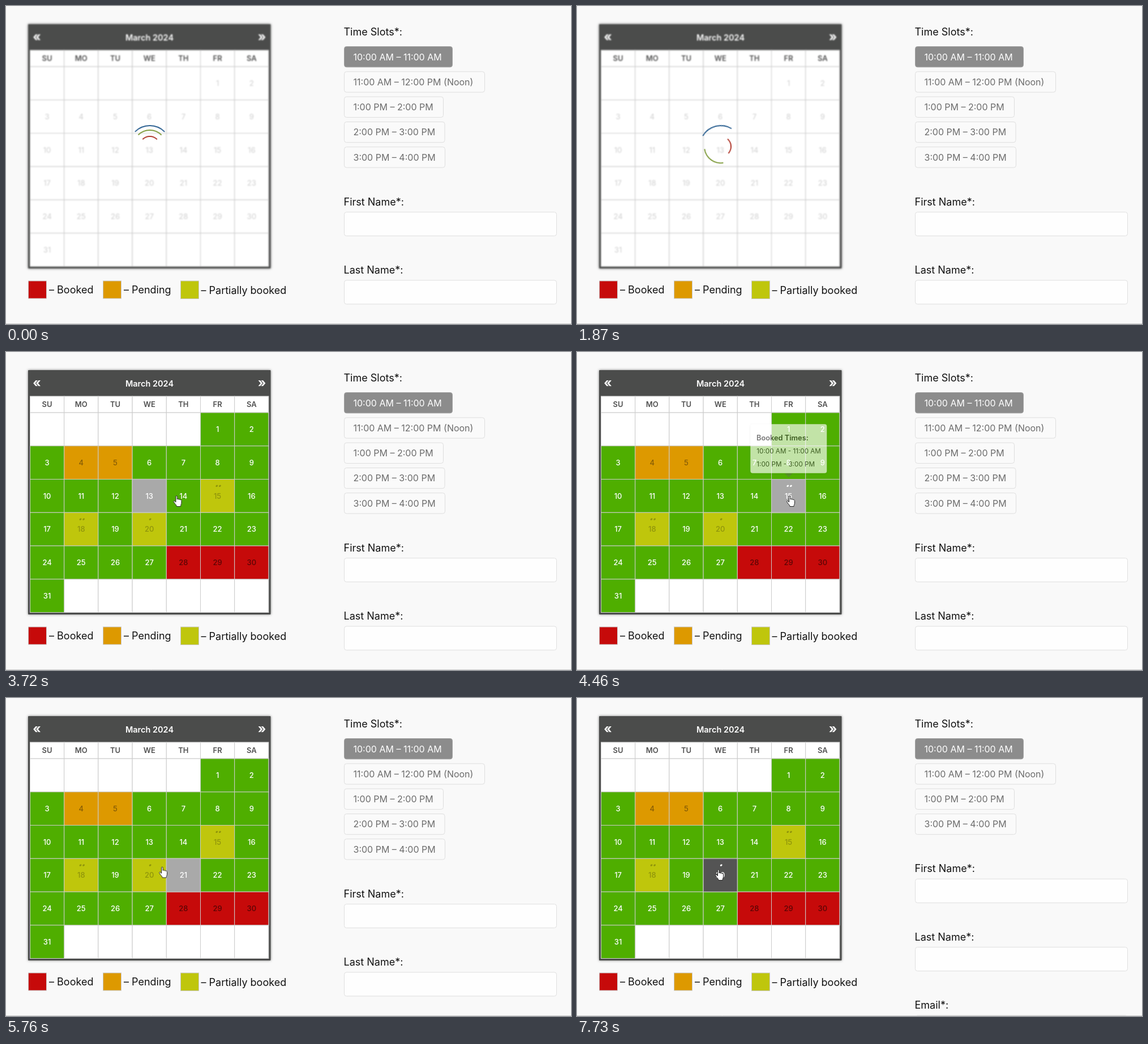
An HTML page that plays this animation: 998x561 px, repeating every 8000 ms.

```html
<!DOCTYPE html>
<html lang="en">
<head>
<meta charset="utf-8">
<title>Booking calendar</title>
<style>
  html, body { margin: 0; width: 100%; height: 100%; overflow: hidden; background: #f9f9f9; }
  svg { display: block; width: 998px; height: 561px; font-family: Inter, Roboto, sans-serif; }

  .label { font-size: 18px; fill: #111; }
  .slot rect { fill: #fafafa; stroke: #dedede; }
  .slot text { font-size: 16px; fill: #6c6c6c; }
  .slot.on rect { fill: #8c8c8c; stroke: #a2a2a2; }
  .slot.on text { fill: #fff; }
  .field { fill: #fefefe; stroke: #dfdfdf; }

  .frame { fill: #4b4c4b; filter: drop-shadow(0 0 2px rgba(0, 0, 0, .5)); }
  .cell { stroke: #ccc; }
  .head { font-size: 14.5px; font-weight: 600; fill: #fff; }
  .arrow { font-size: 22px; font-weight: 700; fill: #fff; }
  .week { font-size: 13px; font-weight: 600; fill: #505050; }
  .num { font-size: 13px; font-weight: 500; }
  .mid { text-anchor: middle; }

  .tip rect { fill: #fff; filter: drop-shadow(0 1px 2px rgba(0, 0, 0, .1)); }
  .tip path { fill: #666; opacity: .6; }
  .tip text { font-size: 11.7px; fill: #333; }
  .tip .title { font-size: 12.8px; font-weight: 600; }
  .pointer path { fill: #fff; stroke: #222; stroke-linejoin: round; }

  /* every track shares the same 8 s loop */
  .anim { animation: 8s linear infinite; }
  .step { animation: 8s step-end infinite; }

  #cal { animation-name: focus; }
  #pale { animation-name: leave; }
  #live { animation-name: enter; }
  #loader { animation-name: loader; }
  .spin1 { animation-name: spin1; }
  .spin2 { animation-name: spin2; }
  .spin3 { animation-name: spin3; }
  #hover { animation-name: hover; }
  #d15 { animation-name: lit15; }
  #d20 { animation-name: lit20; }
  #tip15 { animation-name: tip15; }
  #tip20 { animation-name: tip20; }
  #pointer { animation-name: move; }
  #arrow { animation-name: arrow; }
  #hand { animation-name: hand; }
  #gone { animation-name: gone; }
  #rest { animation-name: rest; }

  @keyframes focus { 0%, 24.75% { filter: blur(1px); } 26.5%, 100% { filter: blur(0); } }
  @keyframes leave { 0%, 24.75% { opacity: 1; } 26.5%, 100% { opacity: 0; } }
  @keyframes enter { 0%, 24.75% { opacity: 0; } 26.5%, 100% { opacity: 1; } }
  @keyframes loader { 0% { opacity: 1; } 24.75%, 100% { opacity: 0; } }
  @keyframes spin1 { to { transform: rotate(1478.5deg); } }
  @keyframes spin2 { to { transform: rotate(985.6deg); } }
  @keyframes spin3 { to { transform: rotate(1971.3deg); } }

  @keyframes hover {
    0% { opacity: 0; transform: translate(0, 117.5px); fill: #a9a9a9; }
    38.375% { opacity: 1; transform: translate(0, 117.5px); }
    40.75% { transform: translate(60.2px, 117.5px); }
    42.875% { transform: translate(120.4px, 117.5px); }
    44.75% { transform: translate(180.6px, 117.5px); }
    46.6875% { transform: translate(240.8px, 117.5px); }
    48.625% { transform: translate(301px, 117.5px); }
    69% { transform: translate(240.8px, 117.5px); }
    70.875% { transform: translate(240.8px, 176.25px); }
    72.375% { transform: translate(180.6px, 176.25px); }
    93.125%, 100% { opacity: 1; transform: translate(180.6px, 176.25px); fill: #545454; }
  }
  @keyframes lit15 { 0% { fill: #8f940c; } 48.625% { fill: #fff; } 69%, 100% { fill: #8f940c; } }
  @keyframes lit20 { 0% { fill: #8f940c; } 72.375%, 100% { fill: #fff; } }

  @keyframes tip15 {
    0%, 54.5% { opacity: 0; animation-timing-function: cubic-bezier(.2, .6, .4, 1); }
    58.75%, 68.75% { opacity: 1; }
    71.875%, 100% { opacity: 0; }
  }
  @keyframes tip20 {
    0%, 79.5% { opacity: 0; animation-timing-function: cubic-bezier(.2, .6, .4, 1); }
    83.375%, 93.125% { opacity: 1; }
    96.5%, 100% { opacity: 0; }
  }

  @keyframes move {
    0%, 35.75% { transform: translate(5px, 247px); animation-timing-function: cubic-bezier(.3, .15, .7, .65); }
    46.5% { transform: translate(301px, 253px); animation-timing-function: cubic-bezier(.2, .46, .5, 1); }
    51.875%, 65.25% { transform: translate(376px, 253px); animation-timing-function: ease-in-out; }
    75.125% { transform: translate(250px, 309px); animation-timing-function: ease-in-out; }
    80%, 85.5% { transform: translate(249px, 302px); }
    85.625%, 100% { transform: translate(250px, 302px); }
  }
  @keyframes arrow { 0% { opacity: 0; } 35.75% { opacity: 1; } 38.375%, 100% { opacity: 0; } }
  @keyframes hand { 0% { opacity: 0; } 38.375%, 100% { opacity: 1; } }

  @keyframes gone { 0% { opacity: 1; } 93.125%, 100% { opacity: 0; } }
  @keyframes rest { 0% { transform: translate(0, 0); } 93.125%, 100% { transform: translate(0, -44.3px); } }
</style>
</head>
<body>
<svg viewBox="0 0 998 561">
  <g id="cal" class="anim">
    <rect class="frame" x="39" y="32" width="428.5" height="431" rx="1"/>
    <text class="arrow mid" x="54.5" y="62">«</text>
    <text class="head mid" x="253.5" y="61">March 2024</text>
    <text class="arrow mid" x="452" y="62">»</text>
    <g id="grid"></g>
    <g id="pale" class="anim" fill="#d6d6d6"></g>
    <g id="live" class="anim">
      <g id="fills"></g>
      <rect id="hover" class="cell step" x="42.5" y="107" width="60.2" height="58.75"/>
      <g id="nums"></g>
    </g>
  </g>

  <g id="loader" class="step"><g transform="translate(254 248)" fill="none" stroke-width="2">
    <g class="anim spin1">
      <path id="arc37" stroke="#2f6393"/>
      <g class="anim spin2"><path id="arc29" stroke="#7f9b3c"/></g>
      <g class="anim spin3"><path id="arc18" stroke="#b0392d"/></g>
    </g>
  </g></g>

  <g stroke="#c9c9c9">
    <rect x="39.5" y="485" width="32" height="31" fill="#c60a0a"/>
    <rect x="171.5" y="485" width="32" height="31" fill="#dd9900"/>
    <rect x="308.5" y="485" width="32" height="31.5" fill="#bfc60c"/>
  </g>
  <text class="label" x="76" y="507.3">– Booked</text>
  <text class="label" x="208" y="507.3">– Pending</text>
  <text class="label" x="344.5" y="507.5">– Partially booked</text>

  <text class="label" x="596.5" y="51.8">Time Slots*:</text>
  <g id="slots"></g>
  <g id="gone" class="step"></g>
  <g id="rest" class="step"></g>

  <g id="tip15" class="tip anim"></g>
  <g id="tip20" class="tip anim"></g>

  <g id="pointer" class="pointer anim">
    <g id="arrow" class="step"><path d="M.5 0V15L4 11.8L6.4 17L8.5 16L6.2 11H10.8Z"/></g>
    <g id="hand" class="step">
      <path transform="translate(-6 0)" d="M4.5 12V2C4.5.2 7 .2 7 2V7C7 5.8 9.3 5.9 9.5 7.3C9.8 6.3 11.8 6.5 12 8C12.5 7.2 14.5 7.5 14.5 9.5V13C14.5 16 13 16.5 13 19.5H6C6 17.5 4.5 16.5 3 14.5L.8 11.5C0 10 2 9 3 10.2Z"/>
    </g>
  </g>
  <path d="M0 560.5H998" stroke="#cbcbcb"/>
</svg>

<script>
  const $ = id => document.getElementById(id);
  const add = (id, markup) => $(id).insertAdjacentHTML('beforeend', markup);

  const X = 42.5, Y = 107, W = 60.2, H = 58.75;
  const box = (x, y, h, fill) =>
    `<rect class="cell" x="${x}" y="${y}" width="${W}" height="${h}" fill="${fill}"/>`;

  // calendar
  const kinds = {
    free: ['#4fae00', '#fff'],
    pending: ['#dd9900', '#855c06'],
    partial: ['#bfc60c', '#8f940c'],
    booked: ['#c60a0a', '#5a0505']
  };
  const dots = { 15: 2, 18: 2, 20: 1 };
  const kindOf = d =>
    d === 4 || d === 5 ? 'pending' : dots[d] ? 'partial' : d > 27 && d < 31 ? 'booked' : 'free';

  ['SU', 'MO', 'TU', 'WE', 'TH', 'FR', 'SA'].forEach((name, c) => {
    const x = X + c * W;
    add('grid', box(x, 78, Y - 78, '#fff') +
      `<text class="week mid" x="${x + W / 2}" y="97.3">${name}</text>`);
  });

  for (let i = 0; i < 42; i++) {
    const x = X + i % 7 * W, y = Y + Math.floor(i / 7) * H, d = i - 4;
    add('grid', box(x, y, H, '#fff'));
    if (d < 1 || d > 31) continue;
    const [back, ink] = kinds[kindOf(d)];
    const cx = x + W / 2;
    let mark = `<text class="num mid" x="${cx}" y="${y + H / 2 + 4.7}">${d}</text>`;
    add('pale', mark);
    add('fills', box(x, y, H, back));
    for (let k = 0, n = dots[d] || 0; k < n; k++) {
      const dx = cx + 1.5 + (k - (n - 1) / 2) * 5.6;
      mark += `<ellipse rx="2.1" ry="1.5" transform="translate(${dx} ${y + 11.7}) rotate(-35)"/>`;
    }
    add('nums', `<g id="d${d}" class="step" fill="${ink}">${mark}</g>`);
  }

  // loader arcs, a quarter turn each
  for (const r of [37, 29, 18]) {
    const k = r * Math.SQRT1_2;
    $('arc' + r).setAttribute('d', `M${-k} ${-k}A${r} ${r} 0 0 1 ${k} ${-k}`);
  }

  // form
  const slot = (id, row, width, text, on = '') => {
    const y = 71.5 + row * 44.3;
    add(id, `<g class="slot ${on}"><rect x="597.5" y="${y}" width="${width}" height="36.3" rx="4"/>
      <text x="613.5" y="${y + 24}">${text}</text></g>`);
  };
  slot('slots', 0, 191, '10:00 AM – 11:00 AM', 'on');
  slot('slots', 1, 248, '11:00 AM – 12:00 PM (Noon)');
  slot('slots', 2, 175, '1:00 PM – 2:00 PM');
  slot('gone', 3, 177.5, '2:00 PM – 3:00 PM');
  slot('rest', 4, 178, '3:00 PM – 4:00 PM');
  ['First Name', 'Last Name', 'Email'].forEach((name, i) => {
    const y = 351.8 + i * 120.3;
    add('rest', `<text class="label" x="596.5" y="${y}">${name}*:</text>
      <rect class="field" x="597.5" y="${y + 11.8}" width="375" height="42" rx="4"/>`);
  });

  // tooltips
  const tip = (id, cx, y, w, lines) => {
    const x = cx - w / 2, h = 40.5 + lines.length * 23;
    add(id, `<path d="M${cx - 7} ${y + h}h14l-7 7.5z"/>
      <rect x="${x}" y="${y}" width="${w}" height="${h}" rx="4"/>
      <text class="title" x="${x + 10.7}" y="${y + 28.6}">Booked Times:</text>` +
      lines.map((s, i) => `<text x="${x + 11}" y="${y + 51.2 + i * 23}">${s}</text>`).join(''));
  };
  tip('tip15', 373.8, 127.3, 135, ['10:00 AM - 11:00 AM', '1:00 PM - 3:00 PM']);
  tip('tip20', 253.5, 209, 125, ['2:00 PM - 3:00 PM']);
</script>
</body>
</html>
```
